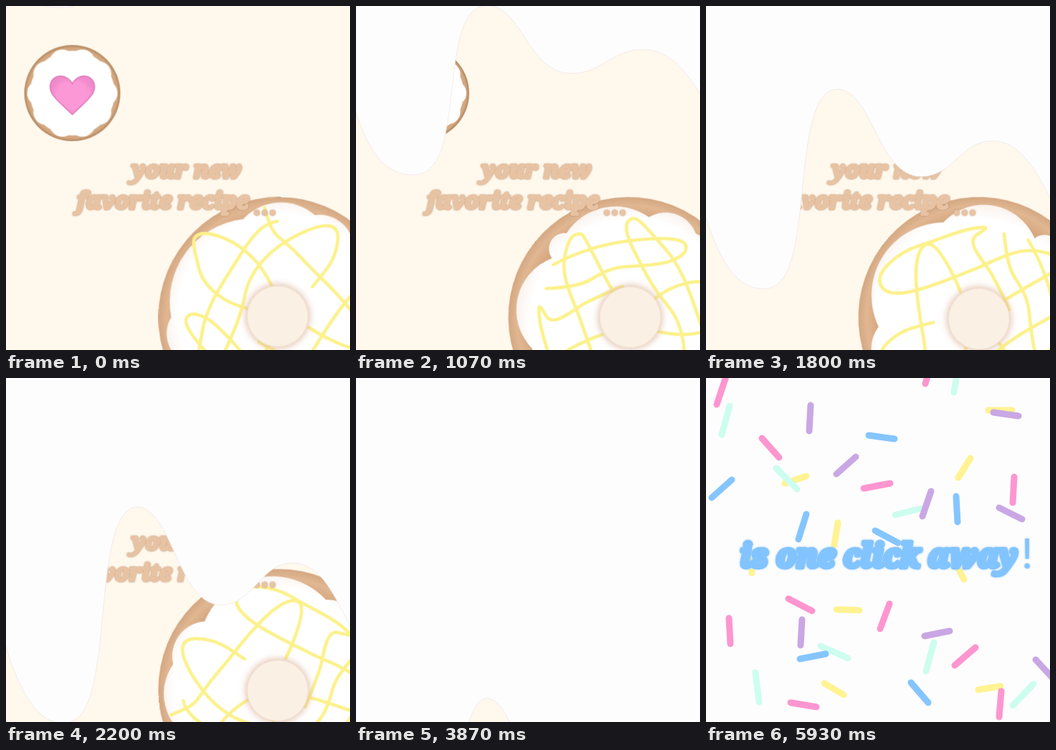
Animation of 480 by 480 pixels, one loop 6190 ms. Source, as an HTML page without scripts:

```html
<!DOCTYPE html>
<html lang="en">
<head>
<meta charset="utf-8">
<title>Recipe teaser</title>
<style>
  html, body { margin: 0; width: 100%; height: 100%; overflow: hidden; background: #fff8ed; }
  svg { display: block; width: 100%; height: 100%; }

  .spin, .pulse, .icing, .party, .settle { animation: 6.19s linear infinite; }
  .spin { animation-name: spin; }
  .pulse { animation-name: pulse; animation-timing-function: ease-in-out; }
  .icing { animation-name: pour; fill: #fefdfe; stroke: #ece8e8; stroke-width: .8; }
  .party { animation-name: show; animation-timing-function: step-end; }
  .settle { animation-name: settle; }

  /* one turn every three seconds */
  @keyframes spin {
    0% { transform: rotate(0); }
    65.75%, 100% { transform: rotate(488.4deg); }
  }
  @keyframes pulse {
    0% { transform: scale(1); }
    10.82% { transform: scale(.9); }
    22.6% { transform: scale(1.03); }
    33.5%, 100% { transform: scale(.9); }
  }
  /* each drip runs down at its own steady pace */
  @keyframes pour {
    0% { d: path("M-2 -72 C20 -5 45 2 80 2 C118 2 126 -35 134 -100 C141 -147 148 -172 183 -172 C232 -172 240 -117 300 -117 C345 -117 355 -126 400 -126 C440 -126 460 -111 482 -90 V-900 H-2 Z"); }
    65.75%, 100% { d: path("M-2 742 C20 822 45 889 80 889 C118 889 126 808 134 714 C141 614 148 479 183 479 C232 479 240 685 300 685 C345 685 355 584 400 584 C440 584 460 662 482 724 V-900 H-2 Z"); }
  }
  @keyframes show {
    0% { opacity: 0; }
    68.95%, 100% { opacity: 1; }
  }
  @keyframes settle {
    0%, 68.95% { transform: scale(1.2); animation-timing-function: ease-in-out; }
    84.8%, 100% { transform: scale(1); }
  }

  text { font: italic 700 32px "Noto Serif", "DejaVu Serif", serif; text-anchor: middle; stroke-linejoin: round; }
  .title { fill: #e7c3a3; stroke: #e7c3a3; stroke-width: 3.6; filter: drop-shadow(0 0 1px #bd9472); }
  .title circle { stroke: none; }
  .shout { fill: #82c4ff; stroke: #82c4ff; stroke-width: 6.5; filter: drop-shadow(0 0 1.5px #a9d3f6); }
  .shout text { font-size: 45px; }
  .shout .mark { font: 400 58px Inter, "Open Sans", sans-serif; stroke: none; }

  .drizzle { fill: none; stroke: #fcf18b; stroke-width: 4.6; stroke-linecap: round; stroke-linejoin: round; }
  .sprinkles { fill: none; stroke-width: 9; stroke-linecap: round; }
</style>
</head>
<body>
<svg viewBox="0 0 480 480">
  <defs>
    <radialGradient id="dough">
      <stop offset=".84" stop-color="#d6a880"/>
      <stop offset=".93" stop-color="#e0b792"/>
      <stop offset="1" stop-color="#d3a782"/>
    </radialGradient>
    <radialGradient id="crust">
      <stop offset=".8" stop-color="#d9b08b"/>
      <stop offset=".94" stop-color="#d3a780"/>
      <stop offset="1" stop-color="#b0845c"/>
    </radialGradient>
    <radialGradient id="frost">
      <stop offset=".9" stop-color="#fff"/>
      <stop offset="1" stop-color="#fbf5f1"/>
    </radialGradient>
    <radialGradient id="candy">
      <stop offset=".7" stop-color="#fc98d6"/>
      <stop offset="1" stop-color="#f08aca"/>
    </radialGradient>
    <filter id="soft" x="-50%" y="-50%" width="200%" height="200%">
      <feGaussianBlur stdDeviation="5"/>
    </filter>
  </defs>

  <rect width="480" height="480" fill="#fff8ed"/>

  <!-- cookie -->
  <g transform="translate(92.5 121.5)">
    <g class="pulse">
      <circle r="67" fill="url(#crust)"/>
      <circle r="59" fill="#fff"/>
      <circle r="45" fill="none" stroke="#fff" stroke-width="36" stroke-linecap="round" pathLength="10" stroke-dasharray="0 1"/>
      <path d="M0 30C-14 16-31 4-31-8C-31-27-8-29 0-13C8-29 31-27 31-8C31 4 14 16 0 30Z" fill="url(#candy)" stroke="#db72b7" stroke-width="1.4"/>
    </g>
  </g>

  <!-- doughnut -->
  <g transform="translate(380.5 434.5)">
    <g class="spin">
      <circle r="168" fill="url(#dough)"/>
      <path fill="url(#frost)" d="M118 78A77 77 0 0 1 2 135A22 22 0 0 1-38 141A81 81 0 0 1-127 65A45 45 0 0 1-150 0A116 116 0 0 1-50-137A72 72 0 0 1 50-143A49 49 0 0 1 105-93A102 102 0 0 1 118 78Z"/>
      <g class="drizzle">
        <path d="M-20-153C-14-132-10-120 0-112S28-87 42-72S75-42 100-11S126 40 113 43S62 27 42 14"/>
        <path d="M-2-134C-20-132-35-118-55-85S-100-20-107 22S-120 82-106 84S-80 60-63 20S-50-28-42-48S-14-95 26-115S86-132 82-105S66-66 47-43"/>
        <path d="M-43-12C-75-20-105-40-112-70S-124-112-110-116S-66-108-50-95S-22-70-8-40"/>
        <path d="M-15 40C-20 55-30 75-41 100S-52 124-44 130S-8 125 8 108S35 65 45 50S72 5 92-20S128-52 140-42S146 5 126 32S95 80 80 95S62 112 70 92S38 68 18 58S-15 42-28 34"/>
        <path d="M8 128C-30 112-64 88-95 55S-134 6-127-1S-110-3-100 2S-68 30-53 47S-20 70-7 75S20 92 40 115"/>
      </g>
      <circle cx="-1.5" cy="-1.5" r="45" fill="#dcb298" opacity=".75" filter="url(#soft)"/>
      <circle cx="-1.5" cy="-1.5" r="42.5" fill="#faf0e3" stroke="#f1e1d2"/>
    </g>
  </g>

  <g class="title">
    <text x="252" y="240">your new</text>
    <text x="219" y="283">favorite recipe</text>
    <circle cx="350" cy="288.5" r="4"/>
    <circle cx="361" cy="288.5" r="4"/>
    <circle cx="372" cy="288.5" r="4"/>
  </g>

  <path class="icing" d="M-2 -72 C20 -5 45 2 80 2 C118 2 126 -35 134 -100 C141 -147 148 -172 183 -172 C232 -172 240 -117 300 -117 C345 -117 355 -126 400 -126 C440 -126 460 -111 482 -90 V-900 H-2 Z"/>

  <g class="party">
    <rect width="480" height="480" fill="#fefdfe"/>
    <g class="sprinkles">
      <path stroke="#fff392" d="M110 147 140 137M369 112 352 139M394 45 427 45M184 202 179 233M61 241 64 272M350 262 360 281M182 323 214 324M165 426 192 442M380 435 411 430"/>
      <path stroke="#cdfdee" d="M33 39 22 79M98 126 127 155M346 20 350-4M264 191 300 182M160 374 198 391M69 411 74 452M318 369 307 409M457 427 428 457"/>
      <path stroke="#c9a7e4" d="M146 38 144 74M209 110 182 134M401 48 436 53M314 158 302 193M409 181 441 197M134 337 132 373M305 360 340 353M460 393 484 419"/>
      <path stroke="#fd96d0" d="M28-2 15 37M78 84 102 111M220 154 257 147M430 138 428 174M306 8 309-2M115 308 148 325M256 315 243 350M32 335 34 371M118 453 154 459M376 376 347 401M412 437 409 473"/>
      <path stroke="#85c5fe" d="M36 142 8 167M227 80 263 85M140 190 129 225M349 165 351 201M236 213 268 230M131 392 167 385M286 425 310 453"/>
    </g>
    <g transform="translate(250 248)">
      <g class="settle">
        <g class="shout">
          <text x="-9" y="16">is one click away</text>
          <text class="mark" x="198" y="18">!</text>
        </g>
      </g>
    </g>
  </g>
</svg>
</body>
</html>
```
